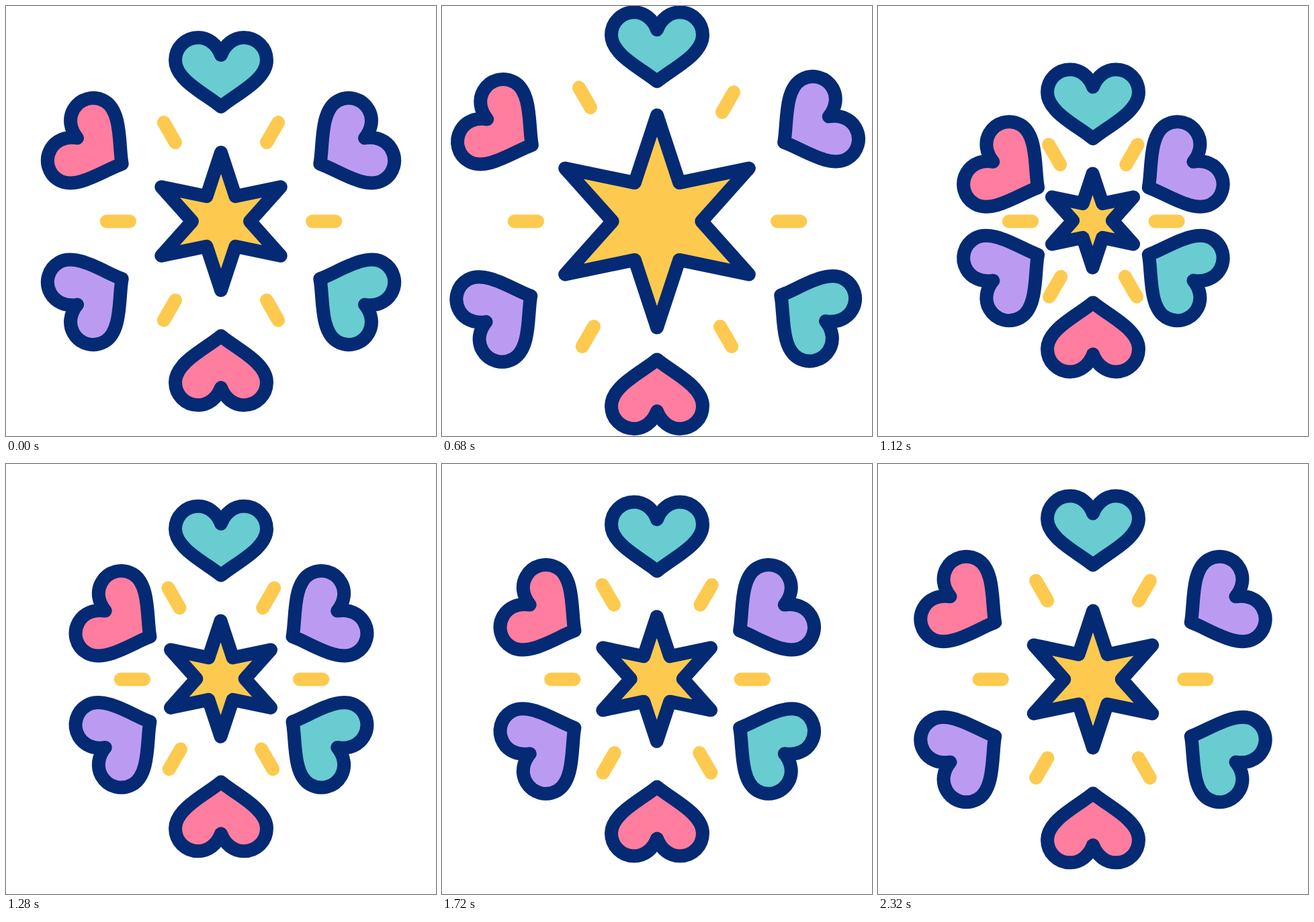
These frames come from a looping animation (640x640 px, 2.36 s). An HTML page:

```html
<!DOCTYPE html>
<html lang="en">
<head>
<meta charset="utf-8">
<title>Heart burst</title>
<style>
  html, body { margin: 0; width: 100%; height: 100%; overflow: hidden; background: #fff; }
  svg { display: block; width: 100%; height: 100%; }
  path { stroke-width: 20; stroke-linecap: round; stroke-linejoin: round; }
</style>
</head>
<body>
<svg id="stage" viewBox="0 0 640 640"></svg>
<script>
const LOOP = 2360, STEP = 40;
const SLOW = 640, GONE = 960;               // leaving: drift, then burst
const START = 800, SETTLE = 1200;           // arriving: burst, then drift
const CX = 320, CY = 320.5;
const NAVY = '#042a74', YELLOW = '#fdca4f', TEAL = '#68ccd1', PINK = '#ff7d9f', PURPLE = '#bb9bf1';

// Heart with its tip at the origin, pointing down
const HEART = 'M0-77C-6-93-19-103-34-103C-53-103-68-88-68-69C-68-39-20-17.5 0 0' +
              'C20-17.5 68-39 68-69C68-88 53-103 34-103C19-103 6-93 0-77Z';
const DASH = 'M0 0V-34.3';

// at: rest position; slow, gone: offsets while leaving; start, settle: offsets while arriving
const hearts = [
  { at: [320, 150], turn: 0, fill: TEAL, slow: [0, -18.8], gone: [0, -169.7], start: [0, 169.6], settle: [0, 17] },
  { at: [320, 491], turn: 180, fill: PINK, slow: [0, 16], gone: [0, 169], start: [0, -172], settle: [0, -19] },
  { at: [172.7, 406], turn: -120, fill: PURPLE, slow: [-16.8, 10.6], gone: [-206, 130.5], start: [147.5, -82.5], settle: [44.8, -24.2] },
  { at: [172.7, 235], turn: -60, fill: PINK, slow: [-15.2, -12.4], gone: [-204, -137], start: [147.5, 81.6], settle: [44.8, 23.7] },
  { at: [467.3, 235], turn: 60, fill: PURPLE, slow: [17.6, -16], gone: [211.5, -144], start: [-147.5, 81.6], settle: [-43.8, 23.7] },
  { at: [467.3, 406], turn: 120, fill: TEAL, slow: [12.8, 9], gone: [206, 133], start: [-147.5, -82.5], settle: [-43.8, -24.2] }
];
const dashes = [
  { at: [184, CY], turn: -90, slow: [-18, 0], gone: [-210, 0], start: [135.6, 0], settle: [22.6, 0] },
  { at: [456, CY], turn: 90, slow: [18, 0], gone: [218, 0], start: [-136, 0], settle: [-20.5, 0] },
  { at: [252, 203], turn: -30, slow: [-14, -26.4], gone: [-150, -231], start: [68, 117], settle: [7, 12] },
  { at: [388, 203], turn: 30, slow: [10.8, -18], gone: [156, -234], start: [-68, 117], settle: [-6.3, 12] },
  { at: [252, 438], turn: -150, slow: [-9.2, 13.6], gone: [-144, 217], start: [67, -117.6], settle: [8.5, -14.5] },
  { at: [388, 438], turn: 150, slow: [9.2, 13.6], gone: [144, 217], start: [-67, -117.6], settle: [-8.5, -14.5] }
];
const star = { at: [CX, CY], turn: 0, slow: [0, 0], gone: [0, 0], start: [-0.5, -1.5], settle: [-0.5, -1] };
const starSize = { slow: 1.184, gone: 4.046, start: 0.1, settle: 0.828 };

function add(parent, tag, attrs = {}) {
  const el = document.createElementNS('http://www.w3.org/2000/svg', tag);
  for (const key in attrs) el.setAttribute(key, attrs[key]);
  return parent.appendChild(el);
}

function build() {
  const group = add(document.getElementById('stage'), 'g');
  return {
    group,
    star: add(group, 'path', { fill: YELLOW, stroke: NAVY }),
    hearts: hearts.map(h => add(group, 'path', { d: HEART, fill: h.fill, stroke: NAVY })),
    dashes: dashes.map(() => add(group, 'path', { d: DASH, fill: 'none', stroke: YELLOW }))
  };
}

function starPath(scale) {
  const points = [];
  for (let i = 0; i < 12; i++) {
    const r = (i % 2 ? 43 : 102.5) * scale, a = i * Math.PI / 6;
    points.push((r * Math.sin(a)).toFixed(2) + ' ' + (-r * Math.cos(a)).toFixed(2));
  }
  return 'M' + points.join('L') + 'Z';
}

const lerp = (a, b, k) => a + (b - a) * k;

function leaving(t, rest, slow, gone) {
  return t < SLOW ? lerp(rest, slow, t / SLOW) : lerp(slow, gone, (t - SLOW) / (GONE - SLOW));
}

function arriving(t, rest, start, settle) {
  return t < SETTLE ? lerp(start, settle, (t - START) / (SETTLE - START))
                    : lerp(settle, rest, (t - SETTLE) / (LOOP - SETTLE));
}

function pose(set, visible, value) {
  set.group.setAttribute('display', visible ? 'inline' : 'none');
  if (!visible) return;
  const place = (el, part) => {
    const [x, y] = part.at.map((p, i) => p + value(0, {
      slow: part.slow[i], gone: part.gone[i], start: part.start[i], settle: part.settle[i]
    }));
    el.setAttribute('transform', `translate(${x.toFixed(2)} ${y.toFixed(2)}) rotate(${part.turn})`);
  };
  set.star.setAttribute('d', starPath(value(1, starSize)));
  place(set.star, star);
  set.hearts.forEach((el, i) => place(el, hearts[i]));
  set.dashes.forEach((el, i) => place(el, dashes[i]));
}

const outgoing = build(), incoming = build();

function draw(ms) {
  const t = Math.floor((ms % LOOP) / STEP + 0.001) * STEP;
  pose(outgoing, t <= GONE, (rest, k) => leaving(t, rest, k.slow, k.gone));
  pose(incoming, t >= START, (rest, k) => arriving(t, rest, k.start, k.settle));
}

let begin = null;
function tick(now) {
  if (begin === null) begin = now;
  draw(Math.max(0, now - begin));
  requestAnimationFrame(tick);
}
draw(0);
requestAnimationFrame(tick);
</script>
</body>
</html>
```
